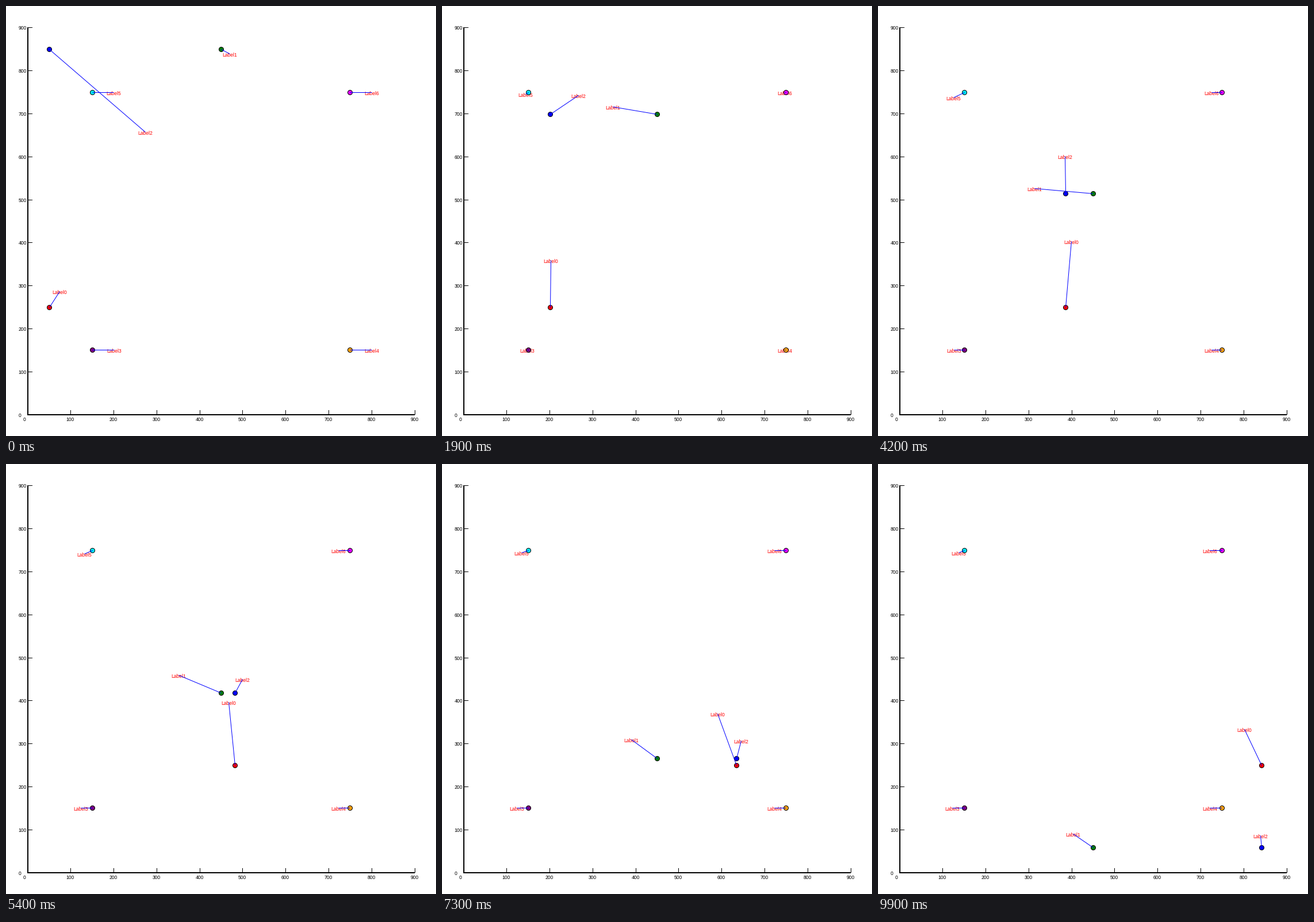
Animation, 748 px wide and 748 px high, one loop 10 s. Source, as a matplotlib script:

```python
import numpy as np
import matplotlib.pyplot as plt
from matplotlib.animation import FuncAnimation
from matplotlib.patches import Circle

SIZE, DPI, FRAMES, INTERVAL = 748, 64, 100, 100
PT = 72 / DPI      # points per pixel
SCALE = SIZE / 1000
MARGIN = 50        # data units around the axes
SPEED = 8          # data units per frame
N = np.arange(FRAMES)

plt.rcParams["font.family"] = "Liberation Sans"
fig = plt.figure(figsize=(SIZE / DPI, SIZE / DPI), dpi=DPI, facecolor="white")
ax = fig.add_axes([0, 0, 1, 1])
ax.set_xlim(0, SIZE)
ax.set_ylim(SIZE, 0)
ax.axis("off")


def to_px(x, y):
    """Centre of the pixel that holds a data point."""
    return (round((x + MARGIN) * SCALE) + 0.5,
            round(SIZE - (y + MARGIN) * SCALE) + 0.5)


def segment(x, y, color="black", width=1, **kw):
    return ax.plot(x, y, color=color, lw=width * PT, snap=False,
                   solid_capstyle="butt", **kw)[0]


def write(x, y, s, color="black", **kw):
    return ax.text(x, y, s, color=color, fontsize=8.5 * PT, va="baseline", **kw)


def draw_axes():
    segment([38, 38], [37, 712], width=2)
    segment([37, 711], [711, 711], width=2)
    for v in range(0, 901, 100):
        x, y = to_px(v, v)
        if v:
            segment([x, x], [703, 711])
            segment([38, 46], [y, y])
        write(x - 7.7, 722, str(v))
        write(21.7, y + 3.5, str(v))


def settle():
    """Label slides from the right of a resting point to its left."""
    ease = 1.95 / (0.95 + np.exp(0.085 * N))
    return np.column_stack([58.2 * ease - 20.7, np.full(FRAMES, 1.5)])


def glide(*keys):
    """Smooth path of offsets through the shared key times."""
    t = np.array([0, 19, 30, 54, 80, 99])
    p = np.array(keys, float)
    m = np.gradient(p, t, axis=0)
    i = np.clip(np.searchsorted(t, N, side="right") - 1, 0, len(t) - 2)
    d = (t[i + 1] - t[i])[:, None]
    u = (N - t[i])[:, None] / d
    return ((1 + 2 * u) * (1 - u) ** 2 * p[i] + u * (1 - u) ** 2 * d * m[i]
            + u * u * (3 - 2 * u) * p[i + 1] + u * u * (u - 1) * d * m[i + 1])


# start, direction, colour, label offsets in pixels
POINTS = [
    ((50, 250), (1, 0), "red",
     glide((18, -26), (1, -80), (20, -106), (-11, -108), (-37, -80), (-30, -61))),
    ((450, 850), (0, -1), "green",
     glide((15, 10), (-77, -11), (-111, 6), (-74, -29), (-38, -29), (-35, -22))),
    ((50, 850), (1, -1), "blue",
     glide((167, 146), (49, -31), (2, -83), (13, -22), (5, -31), (-2, -19))),
    ((150, 150), (0, 0), "purple", settle()),
    ((750, 150), (0, 0), "orange", settle()),
    ((150, 750), (0, 0), "#00eeff",
     glide((37, 1.5), (-5, 5), (-19, 11), (-14, 8), (-11, 6), (-10, 6))),
    ((750, 750), (0, 0), "#e600ff", settle()),
]


class Marker:
    def __init__(self, i, start, step, color, offsets):
        self.start, self.step, self.offsets = start, step, offsets
        self.text = write(0, 0, f"Label{i}", "red", ha="center", zorder=3)
        self.dot = ax.add_patch(Circle((0, 0), 4, fc=color, ec="black", lw=PT,
                                       zorder=4))
        self.line = segment([], [], "blue", zorder=5)

    def move(self, n):
        x, y = to_px(*(s + SPEED * n * d for s, d in zip(self.start, self.step)))
        tx, ty = np.round(self.offsets[n]) + (x, y)
        self.dot.center = (x, y)
        self.text.set_position((tx - 0.5, ty + 2.5))
        self.line.set_data([x, tx], [y, ty - 2])
        return self.text, self.dot, self.line


draw_axes()
markers = [Marker(i, *p) for i, p in enumerate(POINTS)]


def update(n):
    return [a for m in markers for a in m.move(n)]


anim = FuncAnimation(fig, update, frames=FRAMES, interval=INTERVAL,
                     repeat=True, repeat_delay=0, blit=False)
plt.show()
```
